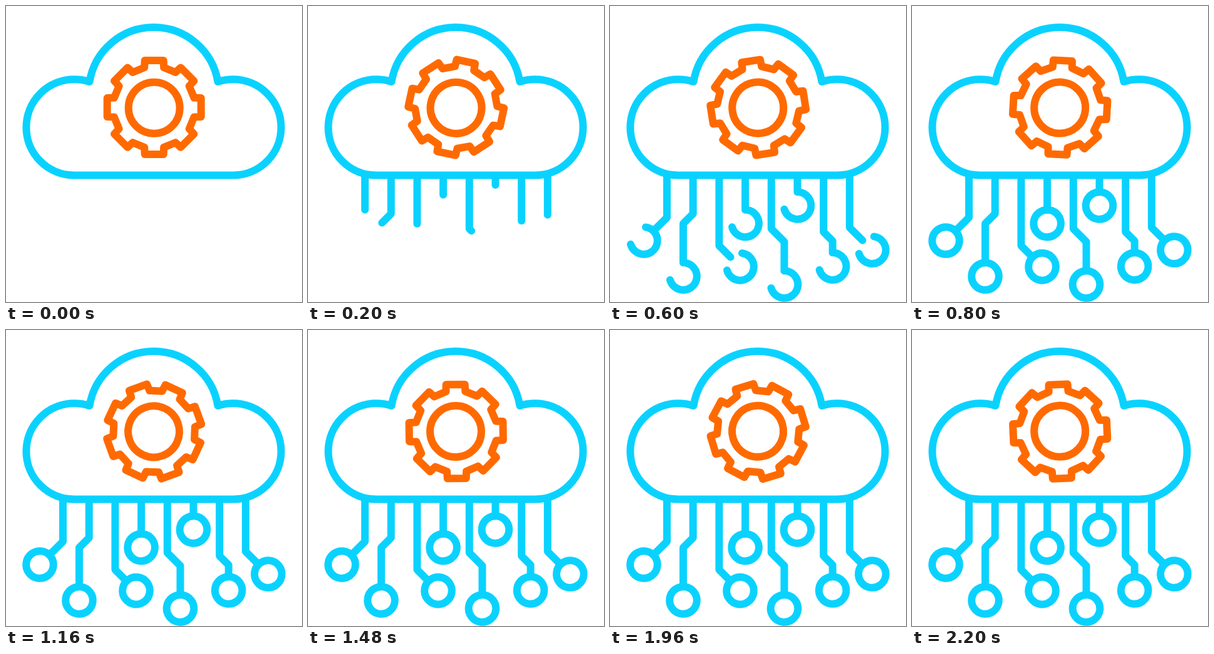
An HTML page that plays this animation: 473 px wide and 473 px high, repeating every 2.24 s.

```html
<!DOCTYPE html>
<html lang="en">
<head>
<meta charset="utf-8">
<title>Cloud network</title>
<style>
html, body { margin: 0; height: 100%; overflow: hidden; background: #fff; }
svg { display: block; width: 100vw; height: 100vh; }
svg * { fill: none; stroke-linecap: round; stroke-linejoin: round; }
</style>
</head>
<body>
<svg viewBox="0 0 473 473" stroke="#0ad2ff" stroke-width="12">
  <g id="wires"></g>
  <path d="M109 270.5A76.6 76.6 0 0 1 109 117.3Q122 117.3 133.5 121A103.9 103.9 0 0 1 338.5 121Q350 117.3 363 117.3A76.6 76.6 0 0 1 363 270.5Z"/>
  <g id="gear" stroke="#ff6a00">
    <path id="teeth"/>
    <circle cy=".7" r="41"/>
  </g>
</svg>
<script>
const LOOP = 2240, STEP = 40, WIRE_END = 360, RING_END = 710;
const TOP = 272, RADIUS = 21.8, TEETH = 8;
const el = id => document.getElementById(id);

function add(tag, attrs) {
  const node = document.createElementNS("http://www.w3.org/2000/svg", tag);
  for (const key in attrs) node.setAttribute(key, attrs[key]);
  return el("wires").appendChild(node);
}

// Evenly spaced wires: height of the bend, 45° sidestep, straight tail to the ring's centre
const wires = [
  [338, -37, 0], [332, -15.7, 84.3], [383, 33.6, 0], [347.5, 0, 0],
  [356, 20.7, 68.3], [319, 0, 0], [361, 14.5, 40.5], [354, 36, 0]
].map(([bend, side, tail], i) => {
  const x = 91 + 41.7 * i, cx = x + side, cy = bend + Math.abs(side) + tail;
  return {
    line: add("path", { d: `M${x} ${TOP}V${bend}l${side} ${Math.abs(side)}v${tail}` }),
    length: bend - TOP + Math.abs(side) * Math.SQRT2 + tail - RADIUS,
    ring: add("circle", { cx, cy, r: RADIUS, pathLength: 360, transform: `rotate(-82 ${cx} ${cy})` })
  };
});

// One tooth, repeated around the centre
const tooth = [[-15.5, -63.8], [-15, -75], [15, -75], [15.5, -63.8]];
const corners = Array.from({ length: TEETH }, (_, i) => {
  const a = i * 2 * Math.PI / TEETH, c = Math.cos(a), s = Math.sin(a);
  return tooth.map(([x, y]) => [x * c - y * s, x * s + y * c]);
}).flat();
el("teeth").setAttribute("d", "M" + corners.join("L") + "Z");

function trim(node, progress, length) {
  node.style.visibility = progress > 0 ? "visible" : "hidden";
  node.style.strokeDasharray = `${Math.min(1, Math.max(0, progress)) * length} 999`;
}

function draw() {
  const t = Math.floor(performance.now() % LOOP / STEP) * STEP;
  el("gear").setAttribute("transform", `translate(236.7 162.1) rotate(${135 * t / LOOP})`);
  for (const { line, length, ring } of wires) {
    trim(line, t / WIRE_END, length);
    trim(ring, (t - WIRE_END) / (RING_END - WIRE_END), 360);
  }
  requestAnimationFrame(draw);
}
draw();
</script>
</body>
</html>
```
